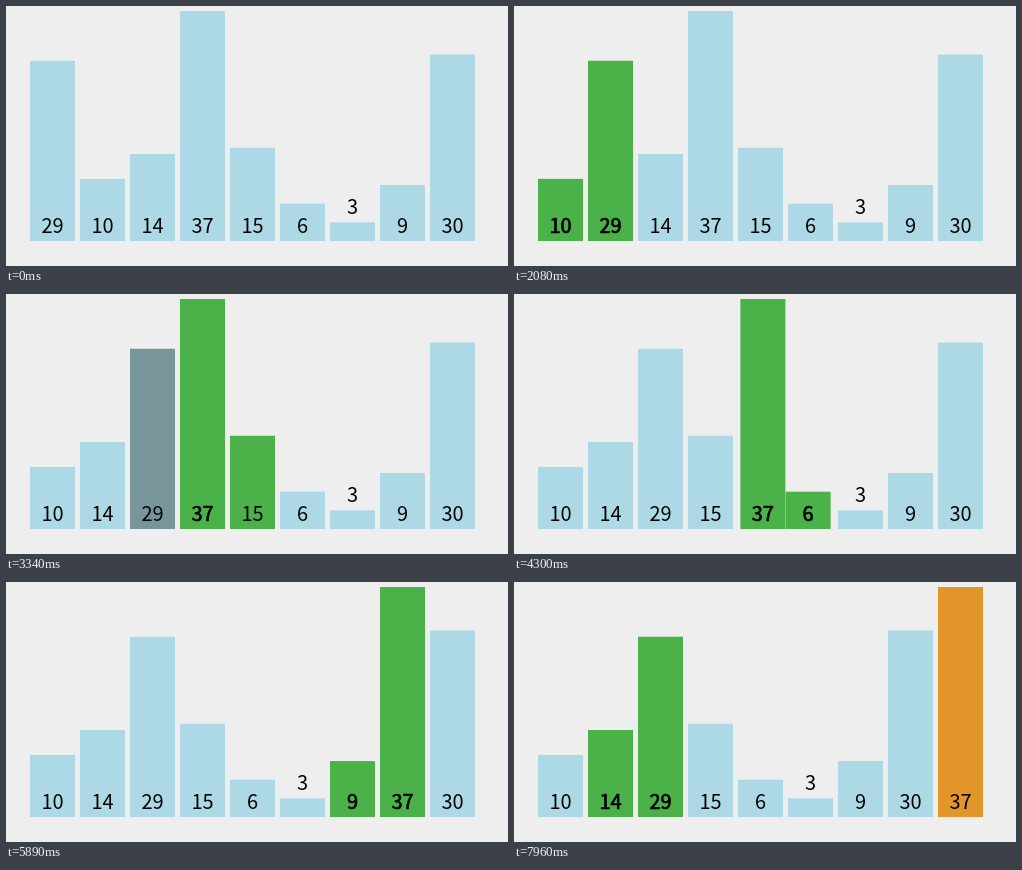
These frames come from a looping animation (502x260 px, 8000 ms). An HTML page:

```html
<!DOCTYPE html>
<html lang="en">
<head>
<meta charset="utf-8">
<title>Bubble sort</title>
<style>
  html, body { margin: 0; width: 100%; height: 100%; overflow: hidden; background: #eee; }
  svg { display: block; width: 502px; height: 260px; }
  text {
    font: 20px "Noto Sans CJK JP", "Noto Sans CJK SC", "Noto Sans CJK", "Noto Sans", sans-serif;
    text-anchor: middle;
    stroke: #000;
    stroke-width: 0;
  }
</style>
</head>
<body>
<svg viewBox="0 0 502 260"><g id="bars"></g><g id="labels"></g></svg>
<script>
const LOOP = 8000, STEP = 40, DURATION = 250, LEAD = 17;
const BASE = 235, LEFT = 24, PITCH = 50, WIDTH = 45, UNIT = 230 / 37;
const BLUE = [173, 216, 230], GREEN = [75, 178, 73], ORANGE = [226, 149, 40], GRAY = [119, 149, 155];
const values = [29, 10, 14, 37, 15, 6, 3, 9, 30];

// [start time, number of steps, action, left slot of the pair]
const events = [
  [1150, 5, 'compare', 0], [1880, 6, 'swap', 0],
  [2260, 5, 'compare', 1], [2570, 6, 'swap', 1],
  [2910, 5, 'compare', 2],
  [3260, 6, 'compare', 3], [3600, 6, 'swap', 3],
  [3950, 5, 'compare', 4], [4300, 6, 'swap', 4],
  [4680, 5, 'compare', 5], [5000, 6, 'swap', 5],
  [5340, 5, 'compare', 6], [5690, 6, 'swap', 6],
  [6080, 5, 'compare', 7], [6390, 6, 'swap', 7],
  [6770, 5, 'settle', 8],
  [7450, 5, 'compare', 0], [7800, 5, 'compare', 1]
];

function add(parent, name, attributes) {
  const node = document.createElementNS('http://www.w3.org/2000/svg', name);
  for (const key in attributes) node.setAttribute(key, attributes[key]);
  return document.getElementById(parent).appendChild(node);
}

const items = values.map(value => {
  const height = value * UNIT;
  const bar = add('bars', 'rect', { y: BASE - height, width: WIDTH, height });
  const label = add('labels', 'text', { y: height < 25 ? 208 : 227 });
  label.textContent = value;
  return { bar, label, inside: height >= 25 };
});

const easeCubic = u => u < 0.5 ? 4 * u ** 3 : 1 - 4 * (1 - u) ** 3;
const mix = (a, b, p) => a.map((v, i) => Math.round(v + (b[i] - v) * p));

function progress(t, start, steps) {
  const k = Math.floor((t - start) / STEP) + 1;
  return k >= steps ? 1 : easeCubic((k * STEP + LEAD) / DURATION);
}

// Blends between blue and green pass through a gray tone.
function fade(from, to, p) {
  if (from === to || p === 1) return to;
  if (to === GREEN) return p < 0.35 ? mix(from, GRAY, p / 0.35) : mix(GRAY, to, Math.min(1, (p - 0.35) / 0.25));
  if (to === BLUE) return p < 0.63 ? mix(from, GRAY, Math.max(0, (p - 0.3) / 0.33)) : mix(GRAY, to, (p - 0.63) / 0.37);
  return mix(from, to, p);
}

function render(t) {
  const order = values.map((_, i) => i);
  let before = values.map(() => BLUE), after = before, p = 1;
  const shift = values.map(() => 0);
  let settled = -1;

  for (const [start, steps, action, slot] of events) {
    if (t < start) break;
    p = progress(t, start, steps);
    before = after;
    if (action === 'swap') {
      const [a, b] = [order[slot], order[slot + 1]];
      order[slot] = b;
      order[slot + 1] = a;
      shift[a] = p - 1;
      shift[b] = 1 - p;
    } else {
      if (action === 'settle') settled = order[slot];
      const lit = action === 'compare' ? [order[slot], order[slot + 1]] : [];
      after = values.map((_, i) => i === settled ? ORANGE : lit.includes(i) ? GREEN : BLUE);
    }
  }

  order.forEach((id, slot) => {
    const { bar, label, inside } = items[id];
    const x = LEFT + PITCH * (slot + shift[id]);
    const heavy = inside && after[id] === GREEN && (before[id] === GREEN || p === 1);
    bar.setAttribute('x', x);
    bar.setAttribute('fill', `rgb(${fade(before[id], after[id], p)})`);
    label.setAttribute('x', x + WIDTH / 2);
    label.style.strokeWidth = heavy ? 0.7 : 0;
  });
}

const origin = performance.now();
function tick() {
  render((performance.now() - origin) % LOOP);
  requestAnimationFrame(tick);
}
tick();
</script>
</body>
</html>
```
